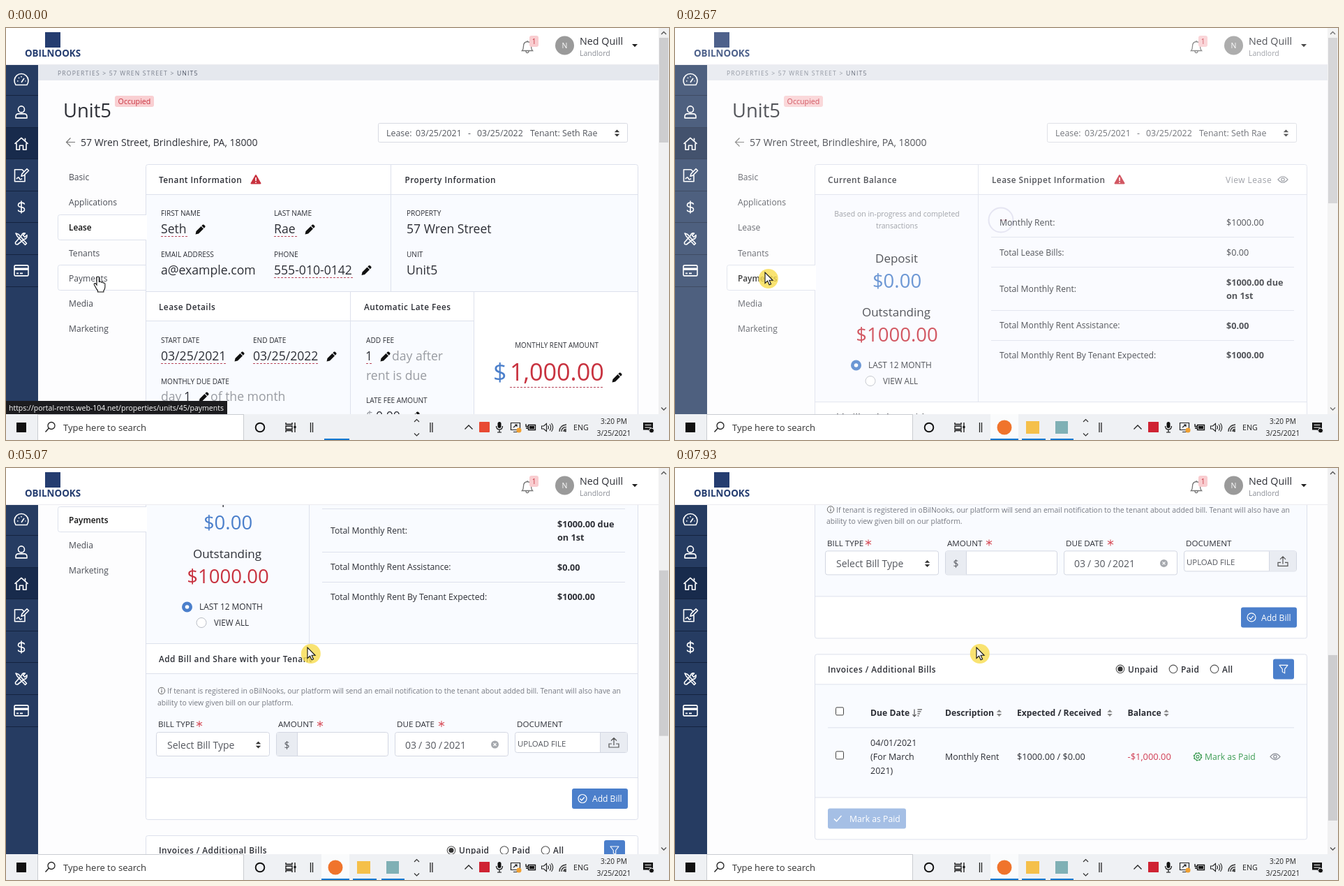
These frames come from a looping animation (950x590 px, 8 s). An HTML page:

```html
<!DOCTYPE html>
<html lang="en">
<head>
<meta charset="utf-8">
<title>Rental portal walkthrough</title>
<style>
@property --s { syntax: "<number>"; inherits: true; initial-value: 0; }
html, body { margin: 0; width: 100%; height: 100%; overflow: hidden; background: #fff; }
svg { display: block; width: 950px; height: 590px; font-family: "Open Sans", "Noto Sans", sans-serif;
  --s: 0; animation: scroll 8s infinite cubic-bezier(.3, .2, .4, 1); }
.page { transform: translateY(calc(var(--s) * -1px)); }
.thumb { transform: translateY(calc(var(--s) * .467px)); }
.lease { animation: before 8s infinite step-end; }
.pay { animation: after 8s infinite step-end; }
.recorder { animation: recorder 8s infinite linear; }
.apps { animation: apps 8s infinite linear; }
.veil { animation: veil 8s infinite linear; }
.arm { transform-origin: 467px 275px; animation: spin 1s infinite linear; }
.cursor { animation: cursor 8s infinite ease-in-out; }
@keyframes scroll {
  0%, 51.9% { --s: 0; }
  57.5%, 59.6% { --s: 189; }
  63.3%, 70.4% { --s: 284; }
  75%, 87.6% { --s: 378; }
  91%, 96.3% { --s: 473; animation-timing-function: linear; }
  99.1% { --s: 543; animation-timing-function: linear; }
  100% { --s: 558; }
}
@keyframes before { 0% { visibility: visible; } 26.6%, 100% { visibility: hidden; } }
@keyframes after { 0% { visibility: hidden; } 26.6%, 100% { visibility: visible; } }
@keyframes recorder { 0%, .8% { opacity: 0; } 3.3%, 18% { opacity: 1; } 20%, 100% { opacity: 0; } }
@keyframes apps { 0%, 18.4% { opacity: 0; } 21.5%, 100% { opacity: 1; } }
@keyframes veil {
  0%, 26.6% { opacity: 0; }
  29%, 31% { opacity: .6; }
  33.3% { opacity: .2; }
  35.5%, 100% { opacity: 0; }
}
@keyframes spin { from { transform: rotate(-241deg); } to { transform: rotate(119deg); } }
@keyframes cursor {
  0%, 6.6% { transform: translate(132px, 356px); }
  15%, 26.5% { transform: translate(130px, 350px); }
  26.6%, 37.4% { transform: translate(129px, 350px); }
  46.3%, 100% { transform: translate(432px, 257px); }
}
</style>
</head>
<body>
<svg id="stage" viewBox="0 0 950 590" xmlns="http://www.w3.org/2000/svg"></svg>
<script>
const INK = '#2d2f36', GRAY = '#8b8e96', PALE = '#999ca2', FIELD = '#55585f';
const RED = '#c8323f', BLUE = '#4b7fcb', LINE = '#dde1ec', EDGE = '#d3d7e2', BODY = '#f9fbff';
const BOLD = 'font-weight="700"', SEMI = 'font-weight="600"', MID = 'text-anchor="middle"';

// Text is placed by the middle of its capitals.
const T = (x, y, s, size = 12.2, fill = INK, more = '') =>
  `<text x="${x}" y="${(y + size * .36).toFixed(1)}" font-size="${size}" fill="${fill}" ${more}>${s}</text>`;
const title = (x, y, s) => T(x, y, s, 11.8, INK, SEMI + ' letter-spacing=".48"');
const label = (x, y, s) => T(x, y, s, 10.1);
const big = (x, y, s, fill = INK) => T(x, y, s, 17.6, fill);
const R = (x, y, w, h, fill = 'none', stroke = 'none', r = 0) =>
  `<rect x="${x}" y="${y}" width="${w}" height="${h}" rx="${r}" fill="${fill}" stroke="${stroke}"/>`;
const C = (x, y, r, fill = 'none', stroke = 'none', w = 1, more = '') =>
  `<circle cx="${x}" cy="${y}" r="${r}" fill="${fill}" stroke="${stroke}" stroke-width="${w}" ${more}/>`;
const P = (d, stroke = LINE, w = 1, fill = 'none', more = '') =>
  `<path d="${d}" stroke="${stroke}" stroke-width="${w}" fill="${fill}" ${more}/>`;
const at = (x, y, s) => `<g transform="translate(${x} ${y})">${s}</g>`;
const group = (name, s) => `<g class="${name}">${s}</g>`;
const each = (list, draw) => list.map(draw).join('');
const hl = (x, y, x2, c = LINE) => P(`M${x} ${y + .5}H${x2}`, c);
const vl = (x, y, y2, c = LINE) => P(`M${x + .5} ${y}V${y2}`, c);
const under = (x, y, x2) => P(`M${x} ${y + .5}H${x2}`, '#b8485c', 1, 'none', 'stroke-dasharray="3 2"');
const ROUND = 'stroke-linejoin="round"';

const pencil = (x, y) => at(x, y, P('M-6.5 6.5l1-4.5 7-7 3.5 3.5-7 7zM2.3-5.8l1.4-1.4q1-.8 2 0l1.5 1.5q.8 1 0 2l-1.4 1.4z', 'none', 0, '#111'));
const warning = (x, y) => at(x, y, P('M0-6L6.5 5.5h-13z', RED, 2, RED, ROUND) + P('M0-3V2M0 3.5V5', '#fff', 1.6));
const eye = (x, y) => at(x, y, P('M-7 0Q0-8.5 7 0Q0 8.5-7 0z', GRAY, 1.2) + C(0, 0, 2.2, 'none', GRAY, 1.2));
const sorter = (x, y, c = '#333') => at(x, y, P('M-3.7-1.2L0-5 3.7-1.2zM-3.7 1.2L0 5 3.7 1.2z', 'none', 0, c));
const star = (x, y) => at(x, y, P('M0-4.5V4.5M-4-2.3L4 2.3M-4 2.3L4-2.3', '#d8505c', 1.1));
const radio = (x, y, on) => C(x, y, 5.8, '#fff', '#555', 1.1) + (on ? C(x, y, 3.6, '#333') : '');

const topBar = () =>
  R(0, 0, 935, 53, '#fff') + hl(0, 52, 935, '#ecebf0') +
  R(56, 6, 22, 22, '#253d70') + T(67, 36.5, 'OBILNOOKS', 13.4, '#253d70', BOLD + ' ' + MID) +
  at(747, 27, P('M-7.5 5.5q2-2 2-6.5q0-6 5.5-6.5q5.5.5 5.5 6.5q0 4.5 2 6.5zM0-7.5V-9M-2 6q0 2.5 2 2.5t2-2.5', '#777', 1.3)) +
  R(750, 11, 13, 16, '#f9cdd0', 'none', 3) + T(756.5, 19, '1', 10, RED, MID) +
  C(800.5, 25, 13.5, '#9a9a9a') + T(800.5, 25, 'N', 10.5, '#fff', MID) +
  T(822, 19, 'Ned Quill', 14.3) + T(822, 36.5, 'Landlord', 10.5, GRAY) +
  P('M897 23h8l-4 4.3z', 'none', 0, '#222');

const icons = [
  'M-8 6.5a10 10 0 1 1 16 0zM0 3l4-6M-6 1h1.5M-4-4l1 1M0-6v1.5M5.5 1h1',
  'M-4.5-4a4.5 4.5 0 1 0 9 0a4.5 4.5 0 1 0-9 0M-8 8.5v-2q0-4 4-4h8q4 0 4 4v2z',
  'M-9.5 0L0-8.5 9.5 0M-7-2V8.5h4.5V2.5h5V8.5H7V-2M5.5-8V-4.5',
  'M5-1V8.5H-9.5V-8.5H1L4-5.5M-7 5q3-4 4-1t4 .5M0 1l1-3.5 7-7 2.5 2.5-7 7z',
  'M4.5-4Q4-6.5 0-6.5T-4.5-3.2Q-4.5-.5 0 0T4.5 3.3Q4.5 6.5 0 6.5T-4.5 4M0-9V9',
  'M-8-8l4 1.5L7.5 6.5l-2 2L-6-4zM8-5.5L5-2.5 2.5-5l3-3Q1.5-9 0-4.5L-8.5 5q-.5 3.5 3 3L4 .5Q8.5 0 8-5.5z',
  'M-10-5.5q0-2 2-2H8q2 0 2 2v11q0 2-2 2H-8q-2 0-2-2zM-10-3H10M-10-1.5H10M-7 4h3M-2 4h4'
];
const sideBar = () =>
  R(0, 53, 46, 500, '#263c62') + R(0, 143, 46, 45, '#182b4c') +
  each(icons, (d, i) => at(22, 75 + i * 45.4, P(d, '#fff', 1.6, 'none', ROUND)) +
    hl(0, Math.round(96 + i * 45.6), 46, '#14233f'));

const pageTop = () =>
  R(46, 53, 889, 1100, '#fdfdfe') + R(46, 53, 889, 22, '#e5e8ee') +
  T(74, 64.5, 'PROPERTIES &gt; 57 WREN STREET &gt; <tspan fill="#4a5162">UNIT5</tspan>', 8.6, '#7b818e', 'letter-spacing="1.17"') +
  T(82, 118, 'Unit5', 27.4) +
  R(156, 97, 56, 16, '#f9cfd2', 'none', 3) + T(184, 105, 'Occupied', 10.7, RED, MID) +
  P('M99 163.5H87M92.5 157.5l-6 6 6 6', '#777', 1.2) +
  T(107, 163.5, '57 Wren Street, Brindleshire, PA, 18000', 14) +
  R(533.5, 136.5, 357, 27, '#fff', '#d8dae2', 2) +
  each([[545, 'Lease:'], [587, '03/25/2021'], [662, '-'], [675, '03/25/2022'], [751, 'Tenant: Seth Rae']],
    ([x, s]) => T(x, 150.5, s, 12.4, FIELD)) + sorter(875.5, 150.5);

const tabNames = ['Basic', 'Applications', 'Lease', 'Tenants', 'Payments', 'Media', 'Marketing'];
const tabY = i => 213.5 + i * 36.2;
const tabBox = i => P(`M200 ${Math.round(tabY(i)) - 18.5}H77.5q-3 0-3 3v30q0 3 3 3H200`, LINE, 1, '#fff');
const tabs = on => R(199, Math.round(tabY(on)) - 18, 3, 35, '#fff') + each(tabNames, (s, i) =>
  i === on ? T(90, tabY(i), s, 11.8, '#111', SEMI) : T(90, tabY(i), s, 12.1, '#4a4d55'));
const card = (y, h) => R(200.5, y + .5, 705, h, '#fff', LINE, 3);

const leasePage = () =>
  card(195, 420) + R(201, 239, 704, 138, BODY) + R(201, 420, 469, 150, BODY) +
  hl(200, 238, 906) + vl(551, 195, 377) + hl(200, 377, 906) + hl(200, 419, 670) + vl(493, 377, 560) + vl(670, 377, 560) +
  tabBox(4) + tabBox(2) + tabs(2) +
  title(219, 217.5, 'Tenant Information') + warning(358, 217) + title(571.5, 217.5, 'Property Information') +
  label(222, 265.5, 'FIRST NAME') + label(384, 265.5, 'LAST NAME') + label(574, 265.5, 'PROPERTY') +
  big(222, 288, 'Seth') + under(222, 298, 260) + pencil(278, 289) +
  big(384, 288, 'Rae') + under(384, 298, 417) + pencil(435, 289) + big(574, 288, '57 Wren Street') +
  label(222, 324, 'EMAIL ADDRESS') + label(384, 324, 'PHONE') + label(574, 324, 'UNIT') +
  big(222, 346.5, 'a@example.com') + big(384, 346.5, '555-010-0142') + under(384, 357, 498) + pencil(516, 347.5) +
  big(574, 346.5, 'Unit5') +
  title(219, 399.5, 'Lease Details') + title(513, 399.5, 'Automatic Late Fees') +
  label(222, 447.5, 'START DATE') + label(354, 447.5, 'END DATE') + label(516, 447.5, 'ADD FEE') +
  big(222, 470, '03/25/2021') + under(222, 480, 316) + pencil(334, 471) +
  big(354, 470, '03/25/2022') + under(354, 480, 449) + pencil(466, 471) +
  big(515, 470, '1') + under(516, 480, 525) + pencil(543, 471) + big(553, 470, 'day after', PALE) +
  big(516, 497.5, 'rent is due', PALE) +
  label(222, 506, 'MONTHLY DUE DATE') + big(222, 528, 'day', PALE) + big(255, 528, '1') + pencil(283, 529) +
  big(293, 528, 'of the month', PALE) +
  label(516, 533.5, 'LATE FEE AMOUNT') + big(516, 556, '$', PALE) + big(530, 556, '0.00') + pencil(585, 557) +
  T(789, 454.5, 'MONTHLY RENT AMOUNT', 9.9, INK, MID) +
  T(698, 493, '$', 34, BLUE) + T(722, 493, '1,000.00', 34.2, RED) + under(722, 514, 857) + pencil(875, 501);

const rents = [
  [278.5, 'Monthly Rent:', '$1000.00'], [321.5, 'Total Lease Bills:', '$0.00'], [374, 'Total Monthly Rent:', ''],
  [426, 'Total Monthly Rent Assistance:', '$0.00', BOLD], [468.5, 'Total Monthly Rent By Tenant Expected:', '$1000.00', BOLD]
];
const balance = () =>
  R(201, 239, 704, 296, BODY) + hl(200, 238, 906) + vl(434, 195, 535) + hl(200, 535, 906) +
  title(219, 217.5, 'Current Balance') + title(454, 217.5, 'Lease Snippet Information') + warning(637, 217) +
  T(789, 217.5, 'View Lease', 12, GRAY, 'letter-spacing=".5"') + eye(871, 217) +
  T(318, 266.5, 'Based on in-progress and completed', 10.5, GRAY, MID) + T(318, 283, 'transactions', 10.5, GRAY, MID) +
  T(317.5, 330, 'Deposit', 17, INK, MID) + T(318, 362, '$0.00', 27.5, BLUE, MID) +
  T(317, 407, 'Outstanding', 17, INK, MID) + T(318, 439, '$1000.00', 27.5, RED, MID) +
  C(259.5, 483, 7.5, BLUE) + C(259.5, 483, 2.8, '#fff') + T(277, 482.5, 'LAST 12 MONTH', 11.9) +
  C(280, 505.5, 7, '#fff', '#b9bdc6') + T(298, 505.5, 'VIEW ALL', 11.7) +
  each(rents, ([y, s, v, b]) => T(465, y, s) + T(790, y, v, 12.6, INK, b)) +
  T(790, 364, '$1000.00 due', 12.7, INK, BOLD) + T(790, 383.5, 'on 1st', 12.7, INK, BOLD) +
  each([299, 342, 404, 447], y => hl(453, y, 887));

const billForm = () =>
  R(201, 579, 704, 148, BODY) + hl(200, 578, 906) + hl(200, 727, 906) +
  title(219, 557.5, 'Add Bill and Share with your Tenant') +
  C(223, 603, 4.7, 'none', '#666') + P('M223 600v1.2M223 602.3v3.4', '#666', 1.2) +
  T(231, 603.5, 'If tenant is registered in oBilNooks, our platform will send an email notification to the tenant about added bill. Tenant will also have an', 10.45, '#777a82') +
  T(217, 620, 'ability to view given bill on our platform.', 10.45, '#777a82') +
  each([[218, 'BILL TYPE'], [390, 'AMOUNT'], [560, 'DUE DATE'], [732, 'DOCUMENT']], ([x, s]) => T(x, 651, s, 11.6)) +
  each([277, 450, 624], x => star(x, 650.5)) +
  each([[215.5, 162], [387.5, 160], [557.5, 162]], ([x, w]) => R(x, 662.5, w, 34, '#fff', EDGE, 3)) +
  R(388, 663, 30, 33, '#e9ecf2') + vl(417, 663, 696, EDGE) + T(402.5, 681, '$', 14, FIELD, MID) +
  T(231, 681, 'Select Bill Type', 14, FIELD) + sorter(361.5, 680.5) +
  each([[572, '03'], [591, '/'], [600.5, '30'], [620, '/'], [627, '2021']], ([x, s]) => T(x, 681, s, 14, FIELD)) +
  C(700.5, 680, 5.5, '#a5a8ad') + P('M698.5 678l4 4M702.5 678l-4 4', '#fff', 1.2) +
  R(729.5, 662.5, 161, 29, '#fff', EDGE, 3) + R(852, 663, 38, 28, '#e9ecf2') + vl(851, 663, 691, EDGE) +
  T(733, 679, 'UPLOAD FILE', 11.4, FIELD) +
  at(871, 677, P('M-3 2H-7V7H7V2H3M0 4V-6M-4-2.5L0-6.5 4-2.5', '#555', 1.2)) +
  R(811, 743, 80, 29, BLUE, 'none', 3) + C(826, 757.5, 6, 'none', '#fff', 1.2) +
  P('M822.5 757.5l2.3 2.5 4-4.5', '#fff', 1.3) + T(840, 758, 'Add Bill', 12.1, '#fff');

const columns = [[280, 'Due Date'], [387, 'Description', 464.5], [490, 'Expected / Received', 623], [648.5, 'Balance', 704]];
const invoices = () =>
  card(810, 265) + R(201, 854, 704, 161, BODY) + hl(200, 853, 906) + hl(219, 915, 887) + hl(200, 1015, 906) +
  title(219, 832, 'Invoices / Additional Bills') +
  each([[638, 'Unpaid', 1], [714, 'Paid'], [773, 'All']], ([x, s, on]) =>
    radio(x, 831.5, on) + T(x + 11, 832, s, 11.9, INK, SEMI + ' letter-spacing=".3"')) +
  R(857, 817, 30, 29, BLUE, 'none', 3) + at(872, 832, P('M-6-6H6L1.7-.5V5.5l-3.4-2v-4z', '#fff', 1.1, 'none', ROUND)) +
  each([886, 949], y => R(230.5, y + .5, 11, 11, '#fff', '#444', 1.5)) +
  each(columns, ([x, s, a]) => T(x, 894.5, s, 12.2, INK, BOLD) + (a ? sorter(a, 894.5, '#888') : '')) +
  P('M343 889v10M340.5 896.5l2.5 3 2.5-3M347.5 889.5h6.5M347.5 892.5h5M347.5 895.5h3.5M347.5 898.5h2', '#555', 1.2) +
  each(['04/01/2021', '(For March', '2021)'], (s, i) => T(280, 937.5 + i * 19.6, s, 12.5)) +
  T(387, 957.5, 'Monthly Rent', 12.4) + T(490, 957.5, '$1000.00 / $0.00', 12.7) + T(648.5, 957.5, '-$1,000.00', 12.9, '#d13e54') +
  C(749, 957, 4.9, 'none', '#3f9d55', 1.2) + C(749, 957, 2, 'none', '#3f9d55', 1.1) +
  C(749, 957, 5.6, 'none', '#3f9d55', 1.4, 'stroke-dasharray="2.2"') +
  T(759, 957.5, 'Mark as Paid', 12.2, '#3f9d55') + eye(860, 957) +
  R(219, 1031, 112, 29, '#a5bfe5', 'none', 3) + P('M228 1046l3.5 3.5 7-8', '#fff', 1.5) + T(250, 1046, 'Mark as Paid', 12.2, '#fff');

const paymentsPage = () => card(195, 592) + balance() + billForm() + tabBox(4) + tabs(4) + invoices();

const scrollBar = () =>
  R(935, 0, 15, 553, '#f0f0f1') +
  P('M939 9l3.5-3.5L946 9M939 543.5l3.5 3.5 3.5-3.5', '#555', 1.4) +
  group('lease', R(936, 14, 13, 150, '#cdcdcf')) + group('pay', group('thumb', R(936, 14, 13, 237, '#cdcdcf')));

const taskBar = () =>
  R(0, 553, 950, 37, '#eff1f4') + R(15, 565, 14, 14, '#111') +
  R(45.5, 553.5, 295, 37, '#fff', '#c9ccd1') +
  C(65, 569.5, 5, 'none', '#222', 1.3) + P('M61.5 573l-5 5.5', '#222', 1.4) + T(82, 572.5, 'Type here to search', 13, '#333') +
  C(364, 572, 6.3, 'none', '#111', 1.9) +
  P('M401 565v2.5h9v-2.5M401 579v-2.5h9v2.5M401 570h9v4.5h-9zM414 565v14', '#111', 1.3) + R(412.5, 570, 3, 3, '#111') +
  P('M436.5 565v14M439.5 565v14M608 565v14M611 565v14', '#222', 1.3) +
  P('M585 564l3.5-3.5 3.5 3.5M585 580.5l3.5 3.5 3.5-3.5', '#333', 1.2) +
  R(456, 588, 36, 2, '#1478d0') +
  group('recorder', R(452, 553, 44, 37, '#fafbfc') + R(452, 588, 44, 2, '#1478d0') + R(463, 561, 22, 22, '#e84a33', 'none', 2)) +
  group('apps', R(452, 553, 40, 37, '#fafbfc') +
    each([[452, 40], [497, 34], [538, 33]], ([x, w]) => R(x, 588, w, 2, '#1478d0')) +
    C(472, 572, 10.5, '#f0742c') + R(503, 563, 19, 18, '#f5c04a') + R(545, 563, 18, 18, '#7fb0b5')) +
  P('M657.5 574.5l5.5-5.5 5.5 5.5', '#222', 1.3) +
  R(678, 564, 15, 15, '#e84a33', 'none', 1) + group('apps', R(678, 564, 15, 15, '#cf2333', 'none', 1)) +
  R(704.5, 564, 5, 9, '#111', 'none', 2.5) + P('M702.5 570q0 5 4.5 5t4.5-5M707 575v4M704 579h6', '#111', 1.2) +
  P('M723.5 565.5h13v10h-13zM727 578.5h6M727 572l5-4M729 568h3v3', '#222', 1.2) + C(735, 576, 3.5, '#f0a030') +
  P('M748.5 568.5h10v7h-10zM745 567v3.5h3.5M745 573h3', '#111', 1.3) + R(750, 570, 7, 4, '#111') +
  P('M767.5 570h3l4-3.5v11l-4-3.5h-3zM776.5 569.5q2 2.5 0 5M779 567.5q3.5 4.5 0 9M781.5 566q4.5 6 0 12', '#222', 1.1) +
  P('M793 578q0-9 10-10M796 578q0-6.5 7-6.5M799 578q0-3.5 4-3.5', '#333', 1.3) + C(801.5, 577, 1.5, '#333') +
  T(813, 572, 'ENG', 10.7, '#222') + T(871, 563, '3:20 PM', 10.1, '#222', MID) + T(871, 580, '3/25/2021', 10.3, '#222', MID) +
  P('M913 565h14v10.5h-4v3l-3-3h-7z', 'none', 0, '#111') + P('M915.5 568.5h9M915.5 572h9', '#fff', 1) +
  C(925, 576.5, 3.5, '#111', '#eff1f4');

const linkTip = () => R(0, 534, 317, 19, '#1c1c1f') +
  T(4, 544.5, 'https://portal-rents.web-104.net/properties/units/45/payments', 10.5, '#fff');

const spinner = () => C(467, 275, 17.5, 'none', '#8f8ab8', 2) + group('arm', P('M467 275h9', '#c03050', 1.6));

const hand = P('M-2 1.5Q-2 0-.3 0T1.4 1.5V8q.3-1.2 1.7-1t1.4 1.5q.3-.8 1.6-.6t1.3 1.5q.3-.6 1.3-.4t1.2 1.6V15q0 3-2 5v2H-.5V20Q-2.5 18-4 14.5L-5.5 12q-.8-1.5.3-2.2t2 .6L-2 12z', '#111', 1.1, '#fff');
const arrow = C(4.8, 9, 14, '#f7dc4e', 'none', 0, 'opacity=".8"') +
  P('M0 0v15.5l3.6-3.4 2.5 5.7 2.5-1.1-2.5-5.4h5z', '#111', 1.1, '#fff');

document.getElementById('stage').innerHTML =
  '<clipPath id="view"><path d="M46 53H935V553H46z"/></clipPath>' +
  `<g clip-path="url(#view)">${group('page', pageTop() + group('lease', leasePage()) + group('pay', paymentsPage()))}</g>` +
  topBar() + sideBar() + scrollBar() +
  group('veil', R(0, 0, 950, 553, '#fff') + spinner()) +
  group('lease', linkTip()) + taskBar() +
  group('cursor', group('lease', hand) + group('pay', arrow));
</script>
</body>
</html>
```
